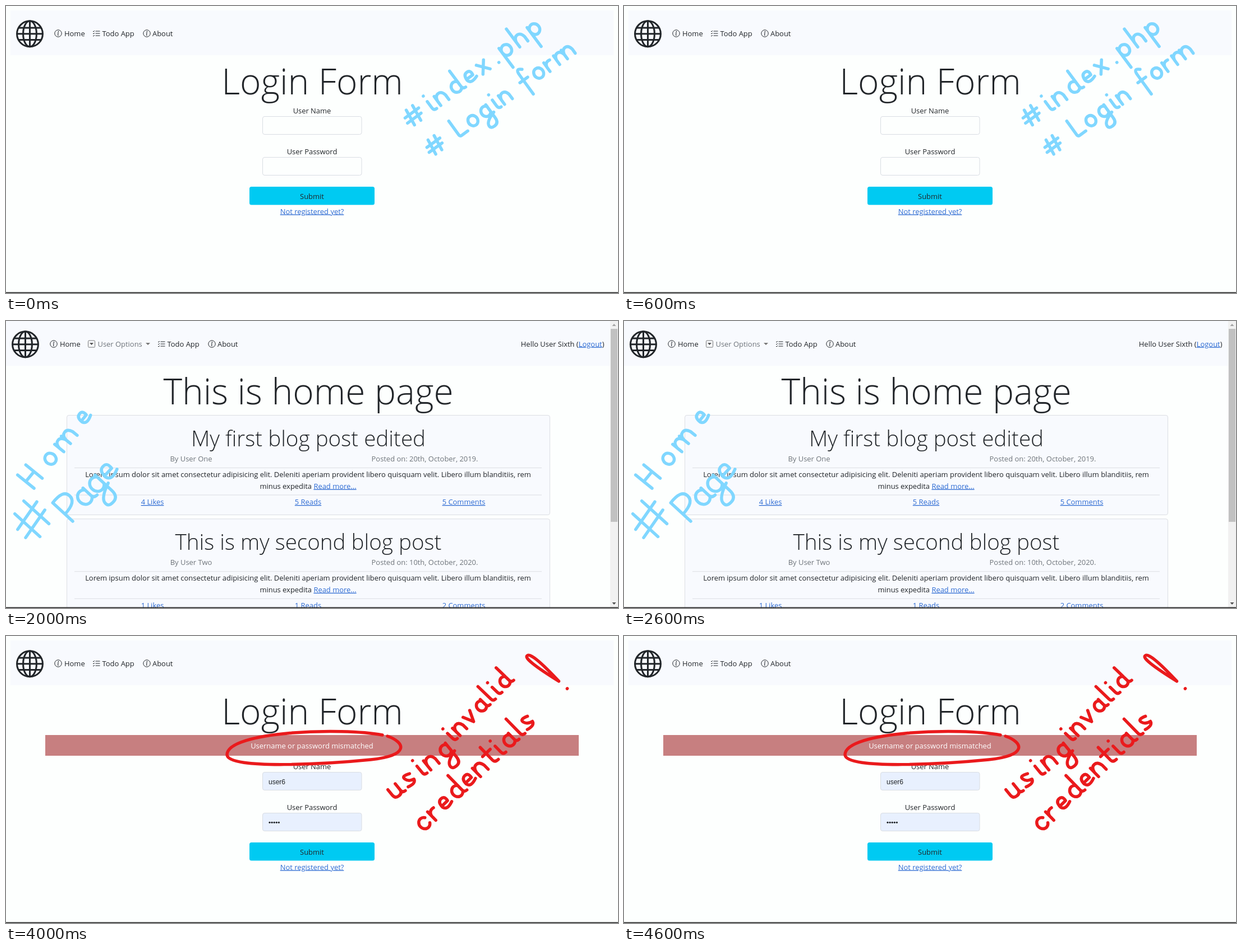
These frames come from a looping animation (1091 px wide and 513 px high, 5 s). An HTML page:

```html
<!DOCTYPE html>
<html lang="en">
<head>
<meta charset="utf-8">
<title>Login walkthrough</title>
<style>
  html, body { margin: 0; width: 100%; height: 100%; overflow: hidden; background: #fdfffe; }
  svg { display: block; width: 1091px; height: 513px; font: 12.95px "Open Sans", "Noto Sans", sans-serif; fill: #212529; }
  .mid { text-anchor: middle; }
  .end { text-anchor: end; }
  .title { font-size: 64px; font-weight: 300; }
  .heading { font-size: 38.6px; font-weight: 300; }
  .muted { fill: #6f757b; }
  .link { fill: #2d6bd3; text-decoration: underline; }
  .typed { font: 12px "Liberation Sans", Arial, sans-serif; }
  .white { fill: #fff; }
  .line { fill: none; stroke: #212529; }
  .ink { fill: none; stroke-linecap: round; stroke-linejoin: round; }
</style>
</head>
<body>
<svg id="stage" viewBox="0 0 1091 513"></svg>
<script>
const BLUE = '#80d7ff', RED = '#ea1a1c', PEN = 5.5;

const text = (x, y, content, style = '') => `<text x="${x}" y="${y}" class="${style}">${content}</text>`;
const mid = (x, y, content, style = '') => text(x, y, content, 'mid ' + style);
const box = (x, y, w, h, fill, extra = '') => `<rect x="${x}" y="${y}" width="${w}" height="${h}" fill="${fill}" ${extra}/>`;
const shift = (x, y, content) => `<g transform="translate(${x} ${y})">${content}</g>`;

// Pen alphabet: baseline at 0, x-height 10, letters assembled from shared strokes.
const bowl = 'M9-8A4.5 5 0 1 0 9-2';
const stem = top => `M9-${top}V-3q0 3 3 3`;
const arch = (x, top = 10) => `M${x}-${top}V0V-5q1-5 4.5-5t4.5 5V0`;
const letters = {
  a: bowl + stem(10),
  c: bowl,
  d: bowl + stem(20),
  e: 'M1-5H8Q9-10 5-10T1-4Q2 1 10-2',
  f: 'M9-17q-5-5-5 3V8M0-8h9',
  g: bowl + 'M9-10V5q0 6-5 6t-4-4q1-4 11-7',
  h: arch(0, 20),
  i: 'M2-10V-3q0 3 3 3M2-16h.1',
  l: 'M2-20V-3q0 3 3 3',
  m: arch(0) + arch(9),
  n: arch(0),
  o: 'M5-10a4.5 5 0 1 0 .1 0',
  p: 'M0-10V11M0-5a4.5 5 0 1 1 0 .1',
  r: 'M0-10V0V-5q1-5 6-4',
  s: 'M8-9Q1-12 2-8T8-3Q7 1 0-1',
  t: 'M3-18V-3q0 3 4 3M-1-11h9',
  u: 'M0-10v6q0 4 4 4t4-4v-6v7q0 3 3 3',
  v: 'M0-10L4 0L9-10',
  x: 'M0-10L8 0M8-10L0 0',
  H: 'M0-18V0M11-18V0M0-9h11',
  L: 'M1-18V-2q0 2 2 2h7',
  P: 'M0-18V0M0-18q11-1 11 5t-11 6',
  '#': 'M4-15L2 0M11-15L9 0M-1-10h15M-2-5h15',
  '.': 'M2 0h.1',
  '!': 'M1-28Q-2-29 2-6Q4-28 1-28M2 0h.1',
};
const advance = c => 'il. '.includes(c) ? 8 : 'rt'.includes(c) ? 10 : c === 'm' ? 22 : '#H'.includes(c) ? 18 : 13;

const ink = (color, path, width = PEN) => `<path class="ink" stroke="${color}" stroke-width="${width}" d="${path}"/>`;

// Spreads a word along the baseline from (x1, y1) to (x2, y2).
function write(color, word, size, x1, y1, x2, y2) {
  const angle = Math.atan2(y2 - y1, x2 - x1) * 180 / Math.PI;
  const total = [...word].reduce((sum, c) => sum + advance(c), 0);
  let done = 0;
  return [...word].map(c => {
    const k = done / total;
    done += advance(c);
    return `<g transform="translate(${x1 + k * (x2 - x1)} ${y1 + k * (y2 - y1)}) rotate(${angle}) scale(${size})">
      ${ink(color, letters[c] || '', PEN / size)}</g>`;
  }).join('');
}

const globe = `<g transform="scale(3.06)" class="line" stroke-width="1"><circle cx="8" cy="8" r="7.5"/>
  <ellipse cx="8" cy="8" rx="3.9" ry="7.5"/><path d="M8 .5v15M.5 8h15M1.5 4.5h13M1.5 11.5h13"/></g>`;
const infoIcon = `<circle cx="6.5" cy="6.5" r="6.2" class="line"/><path class="line" d="M5.3 5.6h1.4L5.9 9.8h1.3"/>
  <circle cx="6.9" cy="3.5" r=".9"/>`;
const listIcon = '<path class="line" d="M4.5 2.5h8M4.5 6.5h8M4.5 10.5h8M0 2.5l1 1 2-2M0 6.5l1 1 2-2M0 10.5l1 1 2-2"/>';
const optionsIcon = `<rect x=".5" y=".5" width="12" height="12" rx="1.5" fill="none" stroke="#777"/>
  <path fill="#555" d="M3 4.5h7l-3.5 4z"/>`;

const nav = (x, y, gap) => shift(x, y,
  shift(10, 17.3, globe) +
  shift(78.5, 34.5, infoIcon) + text(96, 45.5, 'Home') +
  shift(147 + gap, 34.5, listIcon) + text(163.5 + gap, 45.5, 'Todo App') +
  shift(236.5 + gap, 34.5, infoIcon) + text(253 + gap, 45.5, 'About'));

const field = (y, label, filled, value) => mid(545.5, y - 5, label) +
  box(457.5, y + .5, 176.5, 32, filled ? '#e8f0fe' : '#fdfffe', 'rx="3.5" stroke="#d9dde3"') + (filled ? value : '');

const dots = [0, 1, 2, 3, 4].map(i => `<circle cx="${470 + i * 4.1}" cy="287.3" r="1.6"/>`).join('');

const form = (filled, button, y = 0) => shift(0, y,
  field(197, 'User Name', filled, text(468, 218.5, 'user6', 'typed')) +
  field(270, 'User Password', filled, dots) +
  box(434, 323, 223, 32.5, button, 'rx="3.5"') +
  mid(545.5, 345, 'Submit') + mid(545.5, 371.5, 'Not registered yet?', 'link'));

const login = content => box(8, 8, 1075, 80, '#f8fafe') + nav(8, 8, 0) + mid(546, 157.5, 'Login Form', 'title') + content;

const post = (y, title, author, date, likes, reads, comments) => shift(0, y,
  box(108.5, .5, 861, 178, '#f8fafe', 'rx="3.5" stroke="#dcdee3"') +
  mid(539, 55.5, title, 'heading') +
  mid(330, 83, 'By ' + author, 'muted') + mid(746.5, 83, `Posted on: ${date}.`, 'muted') +
  box(122, 94, 833, 1, '#dcdee3') +
  mid(538.5, 111, 'Lorem ipsum dolor sit amet consectetur adipisicing elit. Deleniti aperiam provident libero quisquam velit. Libero illum blanditiis, rem') +
  mid(538.5, 131.5, 'minus expedita <tspan class="link">Read more...</tspan>') +
  box(122, 142.5, 833, 1, '#dcdee3') +
  mid(261, 160, likes + ' Likes', 'link') + mid(538.5, 160, reads + ' Reads', 'link') +
  mid(816, 160, comments + ' Comments', 'link'));

const home = box(0, 0, 1077, 80, '#f8fafe') + nav(0, 0, 124) +
  shift(146, 34.5, optionsIcon) + text(163.5, 45.5, 'User Options', 'muted') +
  '<path fill="#777" d="M249 39h8l-4 4z"/>' +
  text(1066.5, 45.5, 'Hello User Sixth (<tspan class="link">Logout</tspan>)', 'end') +
  mid(539, 149, 'This is home page', 'title') +
  post(168, 'My first blog post edited', 'User One', '20th, October, 2019', 4, 5, 5) +
  post(353.3, 'This is my second blog post', 'User Two', '10th, October, 2020', 1, 1, 2) +
  box(1077, 0, 14, 513, '#f1f1f1') + box(1078, 14, 12, 345, '#c1c1c1') +
  '<path fill="#a3a3a3" d="M1080.5 9h7l-3.5-4z"/><path fill="#505050" d="M1080.5 503h7l-3.5 4z"/>' +
  write(BLUE, '#', 4, 56, 392, 92, 340) +
  write(BLUE, 'Home', 2.1, 50, 299, 163, 160) +
  write(BLUE, 'Page', 2.7, 119, 358, 205, 265);

const scenes = [
  login(form(false, '#00caf2') +
    write(BLUE, '#index.php', 2, 725, 215, 966, 36) +
    write(BLUE, '# Login form', 1.9, 763, 267, 1025, 77)),
  login(form(true, '#31d2f4') +
    ink(BLUE, 'M427 161C405 172 424 190 432 196Q425 206 413 209C425 225 410 250 411 290Q415 318 430 326') +
    ink(BLUE, 'M666 170C700 168 682 196 696 195Q703 194 710 184C700 200 715 240 715 265Q712 300 690 314') +
    write(BLUE, 'inputs', 2.3, 778, 226, 918, 140)),
  home,
  home +
    write(RED, 'exit', 2.2, 854, 207, 944, 153) +
    ink(RED, 'M964 138Q1003 118 1017 52M997 69L1017 50L1027 88'),
  login(box(70, 177, 951, 37, '#c77f80') + mid(545.5, 201, 'Username or password mismatched', 'white') +
    form(true, '#00caf2', 46) +
    ink(RED, 'M671 177C600 163 395 170 394 212C394 240 580 228 650 221S712 190 680 179') +
    write(RED, 'using', 2.1, 694, 291, 806, 200) +
    write(RED, 'invalid', 1.9, 798, 190, 908, 76) +
    write(RED, 'credentials', 2.1, 745, 350, 952, 148) +
    write(RED, '!', 3.3, 996, 99, 1029, 62)),
];

const stage = document.getElementById('stage');
stage.innerHTML = scenes.map(scene => `<g display="none">${scene}</g>`).join('') + box(0, 511.5, 1091, 1.5, '#2a2a2a');
const layers = [...stage.children].slice(0, scenes.length);

function draw() {
  const current = Math.floor(performance.now() / 1000) % scenes.length;
  layers.forEach((layer, i) => layer.setAttribute('display', i === current ? 'inline' : 'none'));
  requestAnimationFrame(draw);
}
draw();
</script>
</body>
</html>
```
